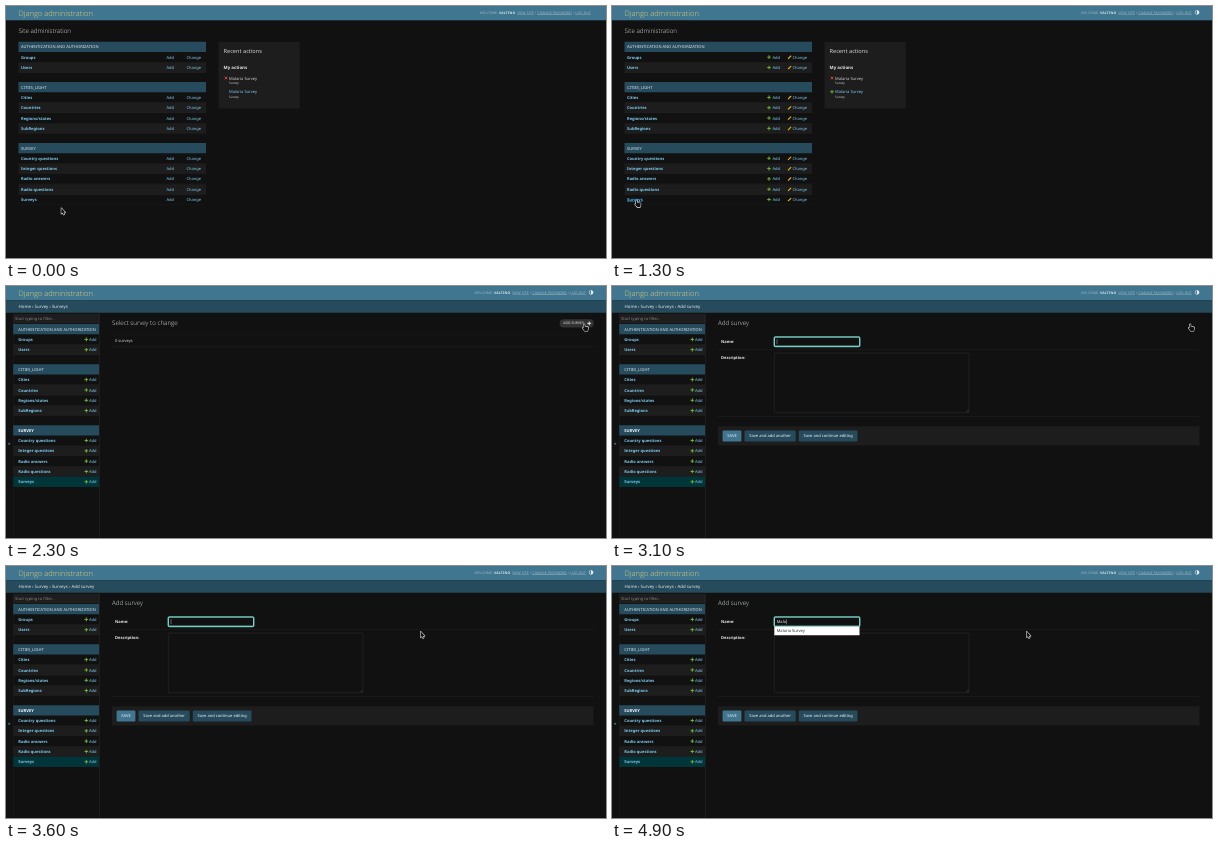
Write an HTML page with a canvas that moves like this. It is 600 by 252 pixels and loops after 5 s.

```html
<!DOCTYPE html>
<html lang="en">
<head>
<meta charset="utf-8">
<title>Admin walkthrough</title>
<style>
html, body { margin: 0; width: 100%; height: 100%; overflow: hidden; background: #111; }
canvas { display: block; width: 600px; height: 252px; }
</style>
</head>
<body>
<canvas id="stage"></canvas>
<script>
const W = 600, H = 252, LOOP = 5000, STEP = 100;
const canvas = document.getElementById('stage');
const ctx = canvas.getContext('2d');
const dpr = window.devicePixelRatio || 1;
canvas.width = W * dpr;
canvas.height = H * dpr;
ctx.textRendering = 'geometricPrecision';

const C = {
  body: '#111', dark: '#1d1d1d', hair: '#222', border: '#303030',
  primary: '#264b5d', secondary: '#417690', accent: '#e2d274',
  fg: '#e6e6e6', quiet: '#cfcfcf', link: '#7cc9ec', hover: '#4ac1f7',
  selected: '#00363a', green: '#70bf2b', yellow: '#efb80b', red: '#dd4646'
};
const ROW = 10.31, CAPTION = 10.25, GAP = 9.38;
const APPS = [
  ['AUTHENTICATION AND AUTHORIZATION', ['Groups', 'Users']],
  ['CITIES_LIGHT', ['Cities', 'Countries', 'Regions/states', 'SubRegions']],
  ['SURVEY', ['Country questions', 'Integer questions', 'Radio answers', 'Radio questions', 'Surveys']]
];

function box(x, y, w, h, color, r = 0) {
  ctx.fillStyle = color;
  ctx.beginPath();
  ctx.roundRect(x, y, w, h, r);
  ctx.fill();
}

function frame(x, y, w, h, color, line, r = 0) {
  ctx.strokeStyle = color;
  ctx.lineWidth = line;
  ctx.beginPath();
  ctx.roundRect(x, y, w, h, r);
  ctx.stroke();
}

function setFont(size, weight) {
  const family = weight < 400 ? '"Open Sans", "Noto Sans"' : '"Noto Sans", "Open Sans"';
  ctx.font = `${weight} ${size}px ${family}, sans-serif`;
}

// y is the middle of the capitals; returns the x where the text ends
function text(s, x, y, size, color, weight = 400, align = 'left') {
  setFont(size, weight);
  ctx.textAlign = align;
  ctx.fillStyle = color;
  ctx.fillText(s, x, y + size * 0.36);
  return x + ctx.measureText(s).width;
}

function plus(x, y, color = C.green, r = 1.8) {
  box(x - r, y - 0.45, 2 * r, 0.9, color);
  box(x - 0.45, y - r, 0.9, 2 * r, color);
}

function line(points, color, width) {
  ctx.strokeStyle = color;
  ctx.lineWidth = width;
  ctx.beginPath();
  points.forEach(([x, y]) => ctx.lineTo(x, y));
  ctx.stroke();
}

function pencil(x, y) {
  line([[x - 1.6, y + 1.6], [x + 1.5, y - 1.5]], C.yellow, 1.1);
}

function cross(x, y) {
  line([[x - 1.3, y - 1.3], [x + 1.3, y + 1.3]], C.red, 0.9);
  line([[x + 1.3, y - 1.3], [x - 1.3, y + 1.3]], C.red, 0.9);
}

function userTools(right) {
  const size = 3.44, y = 6.4, color = '#dbe5ea';
  const parts = [['WELCOME, ', 300], ['VALTINO', 700], ['. ', 300], ['VIEW SITE', 300, true],
    [' / ', 300], ['CHANGE PASSWORD', 300, true], [' / ', 300], ['LOG OUT', 300, true]];
  ctx.letterSpacing = '0.156px';
  const width = parts.reduce((sum, [s, weight]) => {
    setFont(size, weight);
    return sum + ctx.measureText(s).width;
  }, 0);
  let x = right - width;
  for (const [s, weight, isLink] of parts) {
    const end = text(s, x, y, size, color, weight);
    if (isLink) box(x, y + 2.2, end - x, 0.35, 'rgba(255,255,255,.5)');
    x = end;
  }
  ctx.letterSpacing = '0px';
}

function header(loaded) {
  box(0, 0, W, 14.2, C.secondary);
  text('Django administration', 12.5, 6.8, 7.5, C.accent, 300);
  userTools(loaded ? 580 : 585);
  if (!loaded) return;
  frame(583.2, 4.5, 3.8, 3.8, '#f7f7f7', 0.6, 1.9);
  ctx.fillStyle = '#f7f7f7';
  ctx.beginPath();
  ctx.arc(585.1, 6.4, 1.9, -Math.PI / 2, Math.PI / 2);
  ctx.fill();
}

// draws the captions and row backgrounds, then calls drawRow for each model
function appList(x, w, top, pad, current, active, drawRow) {
  for (const [name, models] of APPS) {
    const bold = name === current;
    box(x, top, w, CAPTION, C.primary);
    text(name, x + pad, top + CAPTION / 2, 4.06, bold ? '#fff' : '#dde5e9', bold ? 700 : 400);
    top += CAPTION;
    models.forEach((model, i) => {
      const chosen = model === active;
      if (chosen || i % 2) box(x, top, w, ROW, chosen ? C.selected : C.dark);
      box(x, top + ROW - 0.35, w, 0.35, C.hair);
      drawRow(model, top + ROW / 2);
      top += ROW;
    });
    top += GAP;
  }
}

function dashboard(t) {
  const loaded = t >= 100;
  header(loaded);
  text('Site administration', 12.5, 25, 6.25, C.fg, 300);
  appList(12.5, 187.5, 35.85, 2.5, '', '', (model, y) => {
    const hot = model === 'Surveys' && t >= 800;
    const end = text(model, 15, y, 4.06, hot ? C.hover : C.link, 600);
    if (hot && t >= 1200) box(15, y + 2, end - 15, 0.4, C.hover);
    text('Add', 168, y, 4.06, C.link, 400, 'right');
    text('Change', 195, y, 4.06, C.link, 400, 'right');
    if (loaded) {
      plus(157, y - 0.1);
      pencil(177.6, y);
    }
  });
  box(212.5, 36, 81.3, 66.6, C.dark);
  text('Recent actions', 217.5, 44.6, 5.63, C.quiet);
  text('My actions', 217.5, 61.8, 4.38, C.fg, 600);
  cross(220, 72);
  text('Malaria Survey', 223.1, 72.3, 4.06, C.quiet);
  text('Survey', 223.1, 77.3, 3.1, C.quiet);
  if (loaded) plus(220, 85.8);
  text('Malaria Survey', 223.1, 86, 4.06, C.link);
  text('Survey', 223.1, 91, 3.1, C.quiet);
}

function shell(crumbs, title) {
  header(true);
  box(0, 14.2, W, 12.6, C.primary);
  text(crumbs, 12.5, 20.5, 4.38, '#e3e9ec');
  box(7, 26.8, 0.4, H, C.hair);
  box(93, 26.8, 0.4, H, C.border);
  box(7.4, 28.3, 85.6, 8.7, C.dark);
  frame(7.6, 28.4, 85.2, 8.5, C.border, 0.35);
  text('Start typing to filter...', 9, 32.6, 4.06, '#858585');
  text('«', 2, 157, 4.7, C.link);
  appList(7.2, 85.8, 38.1, 5.1, 'SURVEY', 'Surveys', (model, y) => {
    text(model, 12.3, y, 4.06, C.link, 600);
    plus(80.3, y - 0.1);
    text('Add', 90.6, y, 4.06, C.link, 400, 'right');
  });
  text(title, 106, 37, 6.25, C.fg, 300);
}

function listPage() {
  shell('Home › Survey › Surveys', 'Select survey to change');
  box(553.6, 33.3, 34.2, 8.2, '#333', 4.1);
  text('ADD SURVEY', 557.3, 37.2, 3.44, C.fg);
  plus(583.2, 37.3, '#f2f2f2', 1.9);
  box(106, 48.7, 481.5, 0.35, C.hair);
  text('0 surveys', 109, 54.8, 4.06, C.quiet);
  box(106, 60.8, 481.5, 0.35, C.hair);
}

function button(label, x, w, color) {
  box(x, 144.5, w, 11, color, 1.2);
  text(label, x + w / 2, 150, 4.06, '#f0f0f0', 400, 'center');
}

function formPage(t) {
  shell('Home › Survey › Surveys › Add survey', 'Add survey');
  text('Name:', 109, 56, 4.06, C.fg, 700);
  text('Description:', 109, 72, 4.06, C.fg, 700);
  box(106, 63.3, 481.5, 0.35, C.hair);
  box(106, 130.3, 481.5, 0.35, C.hair);
  frame(162.3, 67.1, 194.6, 59.6, C.border, 0.5, 1);
  line([[354.6, 126], [356.3, 124.3]], '#777', 0.35);
  line([[355.6, 126], [356.3, 125.3]], '#777', 0.35);

  box(106, 140.2, 481.5, 19.3, C.dark);
  button('SAVE', 110.6, 18.8, C.secondary);
  button('Save and add another', 132.5, 51.2, C.primary);
  button('Save and continue editing', 186.8, 58.7, C.primary);

  const typed = 'Mala'.slice(0, [4500, 4600, 4800, 4900].filter(k => t >= k).length);
  frame(162.2, 50.9, 85.6, 9.6, '#4fbfb4', 1.4, 1.3);
  frame(162.5, 51.2, 85, 9, '#cdeeea', 0.45, 1);
  const end = text(typed, 164.7, 55.7, 4.06, C.fg);
  box(end + 0.1, 53.2, 0.4, 5, '#ddd');
  if (typed) {
    box(162.3, 60.8, 85.2, 8.4, '#fff');
    text('Malaria Survey', 164.7, 65, 4.06, '#333');
  }
}

// time, x, y of the pointer tip
const PATH = [
  [0, 55.3, 202], [300, 55.3, 202], [500, 45, 200], [700, 30, 196], [900, 24, 194],
  [1500, 24, 194.3], [1600, 50, 186], [1700, 190, 140], [1800, 380, 88], [1900, 520, 58],
  [2000, 570, 47], [2100, 575, 43], [2300, 577.5, 38], [3100, 577.5, 38], [3200, 452.6, 55],
  [3300, 432, 60.5], [3400, 421, 64], [3500, 416, 65.3], [3600, 414.7, 65.5], [5000, 414.7, 65.5]
];

function pointerAt(t) {
  const i = PATH.findIndex(k => k[0] > t);
  const [t0, x0, y0] = PATH[i - 1], [t1, x1, y1] = PATH[i];
  const p = (t - t0) / (t1 - t0);
  return [x0 + (x1 - x0) * p, y0 + (y1 - y0) * p];
}

const ARROW = new Path2D('M0 0V5.4L1.2 4.4L2 6.2L2.9 5.8L2.1 4.1H3.7Z');
const HAND = new Path2D('M0 .5Q.6 -.4 1.1 .5V2.3L4 2.9Q4.6 3.1 4.4 4L3.8 6.4H1.1L-.9 3.9Q-.9 3 0 3.6Z');

function pointer(t) {
  const [x, y] = pointerAt(t);
  const hand = (t >= 800 && t < 1600) || (t >= 2200 && t < 3200);
  const shape = hand ? HAND : ARROW;
  ctx.save();
  ctx.translate(x, y);
  ctx.scale(1.08, 1.08);
  ctx.lineJoin = 'round';
  ctx.lineWidth = 1;
  ctx.strokeStyle = '#e8e8e8';
  ctx.stroke(shape);
  ctx.fillStyle = '#111';
  ctx.fill(shape);
  ctx.restore();
}

function draw(now) {
  const t = Math.floor((now % LOOP) / STEP) * STEP;
  ctx.setTransform(dpr, 0, 0, dpr, 0, 0);
  box(0, 0, W, H, C.body);
  if (t < 1500) dashboard(t);
  else if (t < 3100) listPage();
  else formPage(t);
  pointer(t);
}

const start = performance.now();
function tick() {
  draw(performance.now() - start);
  requestAnimationFrame(tick);
}
tick();
</script>
</body>
</html>
```
